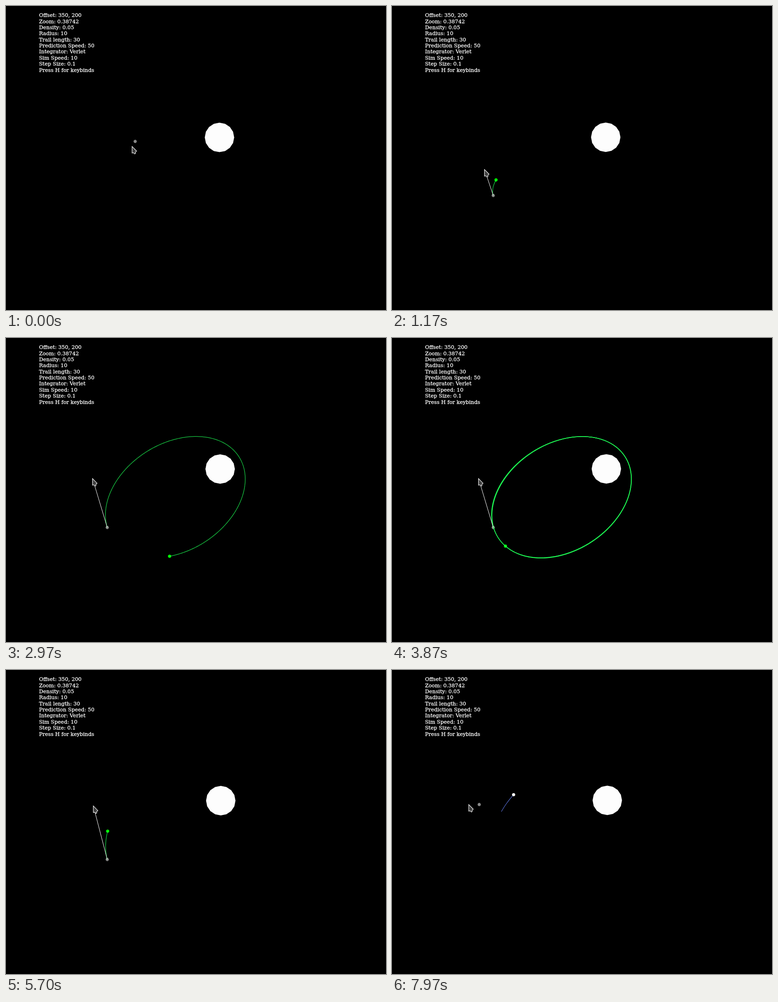
An HTML page with a canvas for the animation above (8 s loop, 837 px wide and 669 px high).

```html
<!DOCTYPE html>
<html lang="en">
<head>
<meta charset="utf-8">
<title>Orbit sandbox</title>
<style>
  html, body { margin: 0; width: 100%; height: 100%; overflow: hidden; background: #000; }
  canvas { display: block; }
</style>
</head>
<body>
<canvas id="stage" width="837" height="669"></canvas>
<script>
const ctx = document.getElementById('stage').getContext('2d');

const LOOP = 8000, FRAME = 1000 / 30;
const PRESS = 600, RELEASE = 7620;       // ms
const POINTER_LAG = 67;                  // the preview body trails the pointer
const GM = 1.138e7, STEP = 0.00946;
const PREDICTION_RATE = 50 / FRAME, SIM_RATE = 10 / FRAME;  // steps per ms
const TRAIL_LENGTH = 26;
const LAUNCH = { x: 223, y: 417 };
const AIM = { x: 192.8, y: 296.3 };

const LABELS = [
  'Offset: 350, 200', 'Zoom: 0.38742', 'Density: 0.05', 'Radius: 10',
  'Trail length: 30', 'Prediction Speed: 50', 'Integrator: Verlet',
  'Sim Speed: 10', 'Step Size: 0.1', 'Press H for keybinds'
];

// Pointer tip: time, x, y. Two equal positions in a row are a hold.
const POINTER_KEYS = [
  [-67, 284.5, 298], [0, 277.7, 309], [367, 240, 398.5], [433, 231.5, 410],
  [533, 223, 417], [600, 223, 417], [650, 223, 417],
  [1535, 190, 319], [2330, 190, 319],
  [2380, 190, 315], [2640, 190, 315],
  [2776, 190.6, 309.3], [4800, 190.6, 309.3],
  [4870, 191.4, 304.5], [5250, 191.4, 304.5],
  [5931, AIM.x, AIM.y], [7880, AIM.x, AIM.y],
  [7903, 192, 296], [8000, 157, 296]
];

const POINTER_SHAPE = [[0, 0], [0, 14.5], [3.5, 14], [5.5, 16.5], [7.5, 15.7], [7.5, 12.5], [10, 10.3]];

function pointerAt(t) {
  let i = 0;
  while (i < POINTER_KEYS.length - 2 && POINTER_KEYS[i + 1][0] <= t) i++;
  const [t0, x0, y0] = POINTER_KEYS[i], [t1, x1, y1] = POINTER_KEYS[i + 1];
  const p = (t - t0) / (t1 - t0);
  return {
    x: x0 + (x1 - x0) * p,
    y: y0 + (y1 - y0) * p,
    heldFor: x0 === x1 && y0 === y1 ? t - t0 : 0
  };
}

const sunAt = t => ({ x: 470.2 + t * 0.0005, y: 289.2 - t * 0.0003 });

// Velocity Verlet flight from the launch point while the sun drifts.
function fly(aim, start, steps, rate) {
  let { x, y } = LAUNCH, vx = aim.x - x, vy = aim.y - y;
  const pull = t => {
    const sun = sunAt(t), dx = sun.x - x, dy = sun.y - y;
    const k = GM / Math.hypot(dx, dy) ** 3;
    return [dx * k, dy * k];
  };
  let [ax, ay] = pull(start);
  const points = [[x, y]];
  for (let i = 1; i <= steps; i++) {
    vx += ax * STEP / 2;
    vy += ay * STEP / 2;
    x += vx * STEP;
    y += vy * STEP;
    [ax, ay] = pull(start + i / rate);
    vx += ax * STEP / 2;
    vy += ay * STEP / 2;
    points.push([x, y]);
  }
  return points;
}

function polygon(x, y, radius, sides, color) {
  ctx.beginPath();
  for (let i = 0; i < sides; i++) {
    const a = i / sides * 2 * Math.PI;
    ctx.lineTo(x + radius * Math.cos(a), y + radius * Math.sin(a));
  }
  ctx.fillStyle = color;
  ctx.fill();
}

function polyline(points, color, width) {
  ctx.beginPath();
  for (const [x, y] of points) ctx.lineTo(x, y);
  ctx.strokeStyle = color;
  ctx.lineWidth = width;
  ctx.stroke();
}

const body = (x, y, color) => polygon(x, y, 3.6, 10, color);

function drawLabels() {
  ctx.fillStyle = ctx.strokeStyle = '#fff';
  ctx.lineWidth = 0.3;
  ctx.font = '11.5px "DejaVu Serif", serif';
  LABELS.forEach((label, i) => {
    const y = 24.2 + i * 13.38;
    ctx.fillText(label, 72.7, y);
    ctx.strokeText(label, 72.7, y);
  });
}

function drawPrediction(t, pointer) {
  const steps = Math.max(50, Math.round(pointer.heldFor * PREDICTION_RATE));
  const path = fly(pointer, t - steps / PREDICTION_RATE, steps, PREDICTION_RATE);
  body(...path[steps], '#00ff00');
  // Short pieces let overlapping laps grow brighter.
  ctx.globalAlpha = 0.8;
  for (let i = 0; i < steps; i += 50) polyline(path.slice(i, i + 51), '#1eff55', 1.25);
  ctx.globalAlpha = 1;
  polyline([[LAUNCH.x, LAUNCH.y], [pointer.x, pointer.y]], '#fff', 1);
}

function drawLaunched(t) {
  const path = fly(AIM, RELEASE, Math.round((t - RELEASE) * SIM_RATE), SIM_RATE);
  polyline(path.slice(-TRAIL_LENGTH), '#5a73dc', 1.1);
  body(...path[path.length - 1], '#fff');
}

function drawPointer({ x, y }) {
  ctx.beginPath();
  for (const [dx, dy] of POINTER_SHAPE) ctx.lineTo(x + dx, y + dy);
  ctx.closePath();
  ctx.fillStyle = '#404040';
  ctx.fill();
  ctx.strokeStyle = '#fff';
  ctx.lineWidth = 1.1;
  ctx.stroke();
}

function draw(t) {
  ctx.fillStyle = '#000';
  ctx.fillRect(0, 0, 837, 669);
  drawLabels();

  const sun = sunAt(t), pointer = pointerAt(t);
  polygon(sun.x, sun.y, 32.4, 16, '#fdfdfd');

  const dragging = t >= PRESS && t < RELEASE;
  const preview = dragging ? LAUNCH : pointerAt(t - POINTER_LAG);
  body(preview.x, preview.y, '#888');
  if (dragging) drawPrediction(t, pointer);
  if (t >= RELEASE) drawLaunched(t);
  drawPointer(pointer);
}

function tick() {
  const t = performance.now() % LOOP;
  draw(Math.min(239, Math.floor((t + 5) / FRAME)) * FRAME);
  requestAnimationFrame(tick);
}
tick();
</script>
</body>
</html>
```
